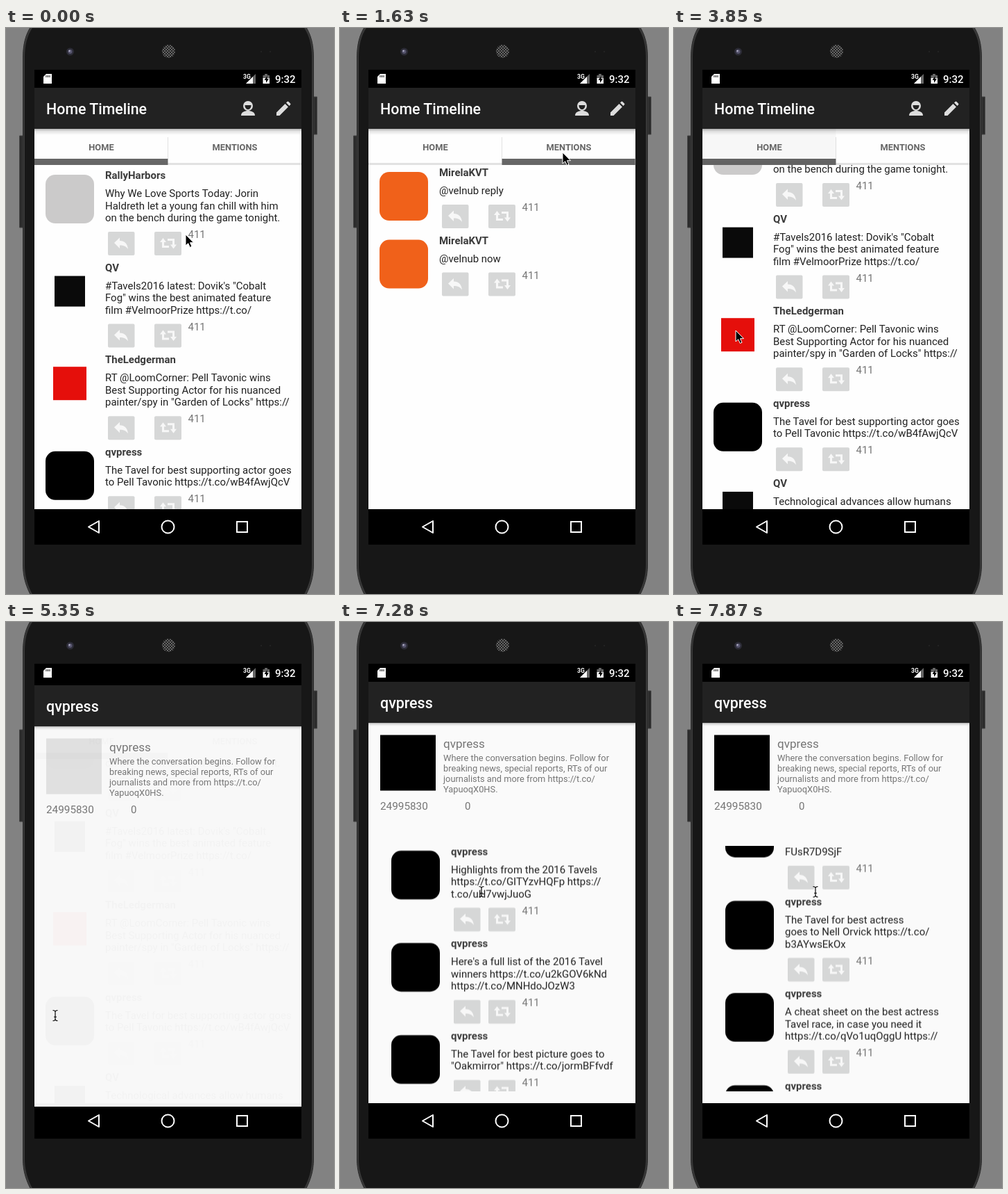
Write an HTML page that moves like this. It is 473 px wide and 814 px high and loops after 8 s.

```html
<!DOCTYPE html>
<html lang="en">
<head>
<meta charset="utf-8">
<title>Home Timeline</title>
<style>
html, body { margin: 0; width: 100%; height: 100%; overflow: hidden; background: #828282; }
svg { display: block; width: 473px; height: 814px; }
text { font-family: Roboto, sans-serif; font-size: 14.97px; fill: #212121; white-space: pre; }
.name { font-weight: 700; fill: #3b3b3b; }
.grey { fill: #757575; }
.title { font-size: 21.4px; font-weight: 500; fill: #fff; }
.tab { font-size: 12.83px; font-weight: 700; fill: #666; text-anchor: middle; }
.bio { font-size: 12.83px; fill: #757575; }

.anim { animation: 8s step-end -5ms infinite; }
#feed { animation-name: feed; }
#pages { animation-name: pages; }
#mark { animation-name: mark; }
#homeTab { animation-name: homeTab; fill: transparent; }
#mentionTab { animation-name: mentionTab; fill: transparent; }
#profile { animation-name: profile; }
#sheet { animation-name: sheet; }
#portrait { animation-name: portrait; }
#posts { animation-name: posts; }
#arrow { animation-name: arrow; }
#beam { animation-name: beam; }

@keyframes feed {
  0% { transform: translateY(0); }
  1.875% { transform: translateY(-18px); }
  3.625% { transform: translateY(-50px); }
  5.5%, 100% { transform: translateY(-70px); }
}
@keyframes pages {
  0% { transform: translateX(0); }
  14.875% { transform: translateX(-209px); }
  16.625% { transform: translateX(-345px); }
  18.5% { transform: translateX(-385px); }
  37% { transform: translateX(-176px); }
  38.875% { transform: translateX(-40px); }
  40.75%, 100% { transform: translateX(0); }
}
@keyframes mark {
  0% { transform: translateX(0); }
  16.625% { transform: translateX(192.5px); }
  38.875%, 100% { transform: translateX(0); }
}
@keyframes mentionTab {
  0% { fill: transparent; }
  14.875% { fill: #b2dff1; }
  18.5% { fill: #b2dff180; }
  20.375%, 100% { fill: transparent; }
}
@keyframes homeTab {
  0% { fill: transparent; }
  37% { fill: #b2dff1; }
  40.75% { fill: #b2dff1a0; }
  42.625% { fill: #b2dff150; }
  44.5% { fill: #00000007; }
  50%, 100% { fill: transparent; }
}
@keyframes profile {
  0% { opacity: 0; transform: translateY(5px); }
  66.875% { opacity: 1; transform: translateY(5px); }
  68.75% { opacity: 1; transform: translateY(1px); }
  70.625%, 100% { opacity: 1; transform: translateY(0); }
}
@keyframes sheet {
  0% { opacity: .98; fill: #f8f8f8; }
  68.75%, 100% { opacity: 1; fill: #fafafa; }
}
@keyframes portrait {
  0% { opacity: .1; }
  68.75% { opacity: .6; }
  70.625%, 100% { opacity: 1; }
}
@keyframes posts {
  0% { opacity: 0; transform: translateY(0); }
  74.25% { opacity: 1; transform: translateY(0); }
  89.125% { opacity: 1; transform: translateY(-45px); }
  91% { opacity: 1; transform: translateY(-134.6px); }
  92.875% { opacity: 1; transform: translateY(-290px); }
  94.625% { opacity: 1; transform: translateY(-415px); }
  96.5% { opacity: 1; transform: translateY(-508px); }
  98.375%, 100% { opacity: 1; transform: translateY(-575.5px); }
}
@keyframes arrow {
  0% { transform: translate(259px, 297px); }
  1.875% { transform: translate(259px, 279px); }
  3.625% { transform: translate(259px, 247px); }
  5.5% { transform: translate(259px, 227px); }
  9.25% { transform: translate(296px, 205px); }
  11% { transform: translate(320px, 186px); }
  13% { transform: translate(321px, 179px); }
  27.75% { transform: translate(298px, 156px); }
  29.625% { transform: translate(238px, 135px); }
  31.5% { transform: translate(176px, 150px); }
  33.375% { transform: translate(154px, 166px); }
  42.625% { transform: translate(150px, 196px); }
  44.5% { transform: translate(130px, 270px); }
  46.25% { transform: translate(105px, 370px); }
  48.125% { transform: translate(89px, 435px); }
  50% { transform: translate(97px, 312px); }
  51.875% { transform: translate(92px, 400px); }
  53.75% { transform: translate(78px, 510px); }
  55.625% { transform: translate(71px, 565px); }
  66.875%, 100% { transform: translate(-50px, 0); }
}
@keyframes beam {
  0% { transform: translate(-50px, 0); }
  66.875% { transform: translate(71px, 566px); }
  78% { transform: translate(98px, 546px); }
  79.875% { transform: translate(150px, 502px); }
  81.75% { transform: translate(190px, 468px); }
  83.625% { transform: translate(205px, 455px); }
  89.125% { transform: translate(205px, 418px); }
  91%, 100% { transform: translate(204px, 388px); }
}
</style>
</head>
<body>
<svg viewBox="0 0 473 814">
  <defs>
    <clipPath id="listClip"><path d="M41 197h385v495H41z"/></clipPath>
    <clipPath id="postClip"><path d="M58 322h351v353H58z"/></clipPath>
    <clipPath id="screenClip"><path d="M41 60h385v637H41z"/></clipPath>
    <linearGradient id="shade" x2="0" y2="1">
      <stop stop-color="#000" stop-opacity=".3"/>
      <stop offset=".4" stop-color="#000" stop-opacity=".1"/>
      <stop offset="1" stop-color="#000" stop-opacity="0"/>
    </linearGradient>
    <pattern id="mesh" width="4" height="4" patternUnits="userSpaceOnUse">
      <path d="M0 0h4v4H0z" fill="#222"/>
      <path d="M0 0h2v2H0zM2 2h2v2H2z" fill="#666"/>
    </pattern>
    <g id="reply">
      <rect width="38.5" height="34" rx="2" fill="#d6d7d7"/>
      <path d="M9 16l8-7.500v4.500c7 0 11 4 12 12c-3-4-6-5.500-12-5.500v4.500z" fill="#f7f7f7"/>
    </g>
    <g id="repost">
      <rect width="39" height="34" rx="2" fill="#d6d7d7"/>
      <path d="M8 15l4.500-6 4.500 6zM23 18.500h9l-4.500 6z" fill="#f7f7f7"/>
      <path d="M12.500 14v7.500H21M27.500 19v-7.500H19" fill="none" stroke="#f7f7f7" stroke-width="3"/>
    </g>
  </defs>

  <!-- Phone body -->
  <path fill="#828282" d="M0 0h473v814H0z"/>
  <path fill="#2b2b2b" stroke="#444" d="M24 155h-4.500v132H24zM444 99h4.500v54H444z"/>
  <path fill="#383838" stroke="#2a2a2a" d="M42-10C31 2 24.500 18 24.500 42V772C24.500 790 29 804 38 820H430C439 804 443.500 790 443.500 772V42C443.500 18 437 2 426-10z"/>
  <path fill="#171717" d="M46-10C34 2 27 18 27 42V772C27 790 32 804 41 820H427C436 804 441 790 441 772V42C441 18 434 2 422-10z"/>
  <circle cx="92.500" cy="34" r="5.500" fill="#2c2c36"/>
  <circle cx="92.500" cy="34" r="3" fill="#58566f"/>
  <circle cx="91.500" cy="33" r="1.200" fill="#b4b2c8"/>
  <circle cx="234.500" cy="33.500" r="9.500" fill="url(#mesh)"/>
  <path fill="#222" d="M367 33h2v2h-2zM380 33h2v2h-2z"/>

  <!-- Screen, status bar and navigation bar -->
  <path d="M41 60h385v683H41z"/>
  <path fill="#fff" d="M58 66h8v14H54V70z"/>
  <path d="M58 68v3M60.500 68v3M63 68v3" stroke="#000"/>
  <text x="342" y="73" style="font-size:8.500px;font-weight:700;fill:#fff">3G</text>
  <path fill="#666" d="M360 66v14h-14z"/>
  <path fill="#fff" d="M356 70v10h-10z"/>
  <path fill="#666" d="M373 66h4v2h3v5h-9.500v-5H373z"/>
  <path fill="#fff" d="M370.500 72h9.500v8h-9.500z"/>
  <path d="M376.500 69l-4 6h2.500v4l4-6h-2.500z"/>
  <text x="388" y="78.500" style="font-weight:500;fill:#fff">9:32</text>
  <g fill="none" stroke="#fff" stroke-width="2">
    <path d="M134 709v17l-15-8.500z" stroke-linejoin="round"/>
    <circle cx="233.500" cy="717.500" r="9"/>
    <path d="M333 710h15v15h-15z"/>
  </g>

  <!-- Timeline screen -->
  <path fill="#222" d="M41 86h385v59H41z"/>
  <text class="title" x="58" y="124">Home Timeline</text>
  <g fill="#ddd">
    <path d="M339 126c0-5 5-7 10-7s10 2 10 7z"/>
    <circle cx="349" cy="112" r="7"/>
    <path fill="#222" d="M344.500 111h9c0 8-9 8-9 0z"/>
    <path d="M390 126v-4.500l12.500-12.500 4.500 4.500-12.500 12.500zM404 107.500l1.500-1.500q1-1 2 0l2.500 2.500q1 1 0 2l-1.500 1.500z"/>
  </g>
  <path fill="#fefefe" d="M41 145h385v547H41z"/>
  <g clip-path="url(#listClip)">
    <g id="pages" class="anim">
      <g id="feed" class="anim"></g>
      <g id="mentions" transform="translate(385 0)"></g>
    </g>
  </g>
  <path fill="#e2e2e2" d="M41 194h385v3H41zM233 157h1v31h-1z"/>
  <path id="mark" class="anim" fill="#666" d="M41 188h192.500v9H41z"/>
  <path id="homeTab" class="anim" d="M41 145h192.500v52H41z"/>
  <path id="mentionTab" class="anim" d="M233.500 145H426v52H233.500z"/>
  <path fill="url(#shade)" d="M41 145h385v9H41z"/>
  <text class="tab" x="137.500" y="176">HOME</text>
  <text class="tab" x="330" y="176">MENTIONS</text>

  <!-- Profile screen -->
  <g clip-path="url(#screenClip)">
    <g id="profile" class="anim">
      <path d="M41 81h385v5H41z"/>
      <path id="sheet" class="anim" d="M41 145h385v547H41z"/>
      <path fill="#222" d="M41 86h385v59H41z"/>
      <path fill="url(#shade)" d="M41 145h385v5H41z"/>
      <text class="title" x="58" y="124">qvpress</text>
      <rect id="portrait" class="anim" x="58" y="162.500" width="80" height="80"/>
      <text class="grey" x="149" y="181" style="font-size:17.100px">qvpress</text>
      <text class="bio" x="149" y="199.500">Where the conversation begins. Follow for</text>
      <text class="bio" x="149" y="214.500">breaking news, special reports, RTs of our</text>
      <text class="bio" x="149" y="229.500">journalists and more from https://t.co/</text>
      <text class="bio" x="149" y="244.500">YapuoqX0HS.</text>
      <text class="grey" x="58" y="269.500" style="font-size:15.300px">24995830</text>
      <text class="grey" x="180" y="269.500">0</text>
      <g clip-path="url(#postClip)"><g id="posts" class="anim"></g></g>
    </g>
  </g>

  <!-- Pointers -->
  <path id="arrow" class="anim" stroke="#fff" d="M0 0V16L3.700 12.700 6.300 18.500 9 17.300 6.500 11.700H11.500z"/>
  <g id="beam" class="anim" fill="none">
    <path stroke="#fff" stroke-width="2.500" opacity=".6" d="M0-7V7"/>
    <path stroke="#000" stroke-width="1.200" d="M-3.500-7.500Q0-7.500 0-5Q0-7.500 3.500-7.500M0-6V6M-3.500 7.500Q0 7.500 0 5Q0 7.500 3.500 7.500M-2 2H2"/>
  </g>
</svg>
<script>
const LINE = 17.5;

// Avatar shapes in a 70 x 70 cell: inset, corner radius, colour
const icons = {
  grey: [0, 14, '#cbcaca'],
  black: [13, 0, '#0a0a0a'],
  red: [11, 0, '#e50f0b'],
  ink: [0, 14, '#000'],
  orange: [0, 14, '#f0611a']
};

function text(cls, x, y, str) {
  return `<text class="${cls}" x="${x}" y="${y}">${str}</text>`;
}

function post(y, left, replyX, [icon, name, ...lines]) {
  const [inset, radius, color] = icons[icon];
  const size = 70 - 2 * inset;
  const end = y + 23.5 + LINE * lines.length;
  return `<rect x="${left + inset}" y="${y - 6 + inset}" width="${size}" height="${size}" rx="${radius}" fill="${color}"/>`
    + text('name', left + 86, y, name)
    + lines.map((s, i) => text('', left + 86, y + 26 + LINE * i, s)).join('')
    + `<use href="#reply" x="${replyX}" y="${end}"/><use href="#repost" x="214" y="${end}"/>`
    + text('grey', 262.5, end + 9, '411');
}

function fill(id, y, left, replyX, items) {
  let out = '';
  for (const item of items) {
    out += post(y, left, replyX, item);
    y += 80.1 + LINE * (item.length - 2);
  }
  document.getElementById(id).innerHTML = out;
}

fill('feed', 217, 57, 147, [
  ['grey', 'RallyHarbors', 'Why We Love Sports Today: Jorin', 'Haldreth let a young fan chill with him', 'on the bench during the game tonight.'],
  ['black', 'QV', '#Tavels2016 latest: Dovik\'s "Cobalt', 'Fog" wins the best animated feature', 'film #VelmoorPrize https://t.co/'],
  ['red', 'TheLedgerman', 'RT @LoomCorner: Pell Tavonic wins', 'Best Supporting Actor for his nuanced', 'painter/spy in "Garden of Locks" https://'],
  ['ink', 'qvpress', 'The Tavel for best supporting actor goes', 'to Pell Tavonic https://t.co/wB4fAwjQcV'],
  ['black', 'QV', 'Technological advances allow humans', 'to see more of the night sky than ever', 'before. https://t.co/']
]);

fill('mentions', 213, 57, 147, [
  ['orange', 'MirelaKVT', '@velnub reply'],
  ['orange', 'MirelaKVT', '@velnub now']
]);

const press = (...lines) => ['ink', 'qvpress', ...lines];
fill('posts', 337, 74, 164, [
  press('Red carpet looks from the', '2016 Tavels, in pictures', 'https://t.co/Kd83mTzQwa'),
  press('Highlights from the 2016 Tavels', 'https://t.co/GITYzvHQFp https://', 't.co/uH7vwjJuoG'),
  press('Here\'s a full list of the 2016 Tavel', 'winners https://t.co/u2kGOV6kNd', 'https://t.co/MNHdoJOzW3'),
  press('The Tavel for best picture goes to', '"Oakmirror" https://t.co/jormBFfvdf'),
  press('The Tavel for best director goes', 'to Ivo Brennart https://t.co/', 'FUsR7D9SjF'),
  press('The Tavel for best actress', 'goes to Nell Orvick https://t.co/', 'b3AYwsEkOx'),
  press('A cheat sheet on the best actress', 'Tavel race, in case you need it', 'https://t.co/qVo1uqOggU https://'),
  press('More from the night', 'https://t.co/')
]);
</script>
</body>
</html>
```
